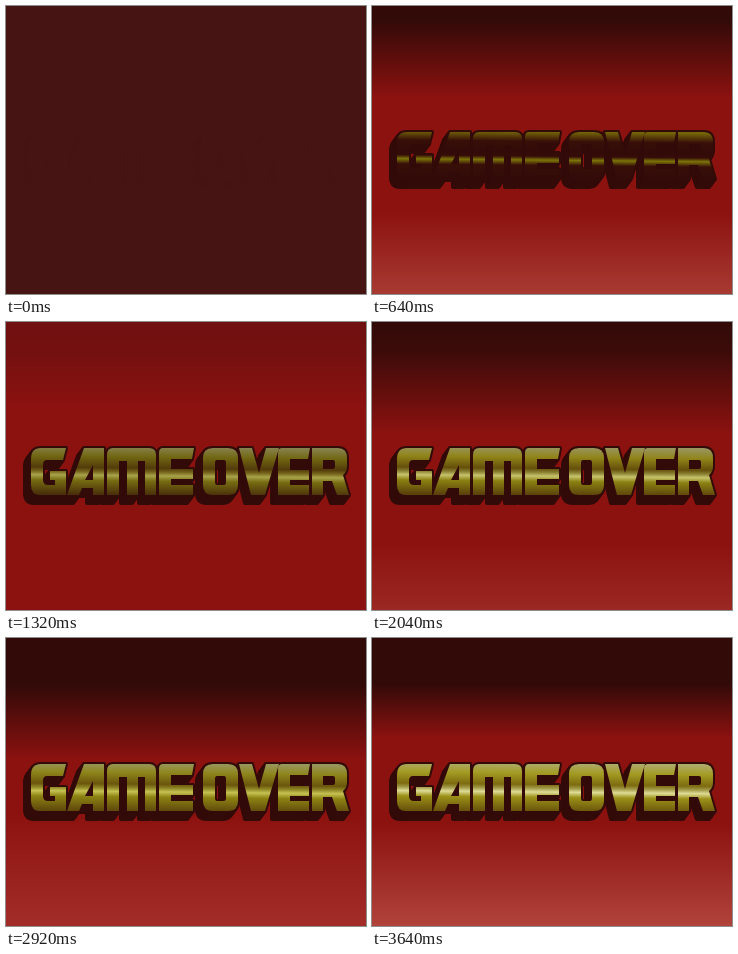
Recreate the animation shown at these times as an HTML page with a canvas. Size 360 by 288 pixels, loop 5000 ms.

```html
<!DOCTYPE html>
<html lang="en">
<head>
<meta charset="utf-8">
<title>Game over</title>
<style>
html, body { margin: 0; width: 100%; height: 100%; overflow: hidden; background: #320a08; }
canvas { display: block; width: 100vw; height: 100vh; }
</style>
</head>
<body>
<canvas id="stage" width="360" height="288" role="img" aria-label="GAME OVER"></canvas>
<script>
const ctx = document.getElementById('stage').getContext('2d');
const LOOP = 5000, STEP = 40, END = 3640;

// Letter faces: G A M E O V E R
const face = new Path2D([
  'M35 126H60L57 138H41Q37 138 37 143V158Q37 163 42 163H49V158H44V149H60V173H34Q25 173 25 163V137Q25 126 35 126Z',
  'M78 126H98V173H87V166H76L73 173H61ZM87 143V158H79Z',
  'M107 126H143Q150 126 150 133V173H139V139H132V173H121V139H113V173H101V133Q101 126 107 126Z',
  'M157 126H188L186 137H165V147H187V157H165V163H187V173H153V131Q153 126 157 126Z',
  'M207 126H222Q232 126 232 136V163Q232 173 222 173H207Q197 173 197 163V136Q197 126 207 126ZM211 138Q209 138 209 141V160Q209 163 211 163H218Q220 163 220 160V141Q220 138 218 138Z',
  'M233 126H246L253 151L260 126H273L259 173H245Z',
  'M276 126H304L302 137H284V148H303V158H284V163H303V173H272V131Q272 126 276 126Z',
  'M307 126H332Q341 126 341 136V144Q341 150 337 153L343 173H331L326 159H317V173H306V126ZM317 138V147H327Q329 147 329 145V140Q329 138 327 138Z'
].join(''));

// Time, background bends (y), background colours, shadow, face colours
const keys = [
  [0, [20, 92, 212], '451413 451413 451413 451413', '451413', '451413 451413 451413 451413 451413 451413 451413'],
  [640, [14, 92, 208], '320a08 320a08 8c1210 a83a32', '320a08', '746408 380f08 320a08 360d08 7c7408 380f08 320a08'],
  [1320, [30, 86, 250], '701010 741010 8c1210 8c1210', '320a08', '86804a 716712 533b0a 76651b a8a34a 776c12 4a300a'],
  [2040, [28, 112, 222], '320a08 3b0b09 8c1210 9b2822', '320a08', '98945a 908418 654f0b 898031 c7c36c 8b8112 5b420b'],
  [2520, [45, 134, 166], '320a08 320a08 8c1210 9c211d', '320a08', '908e52 82791a 624c0b 847b18 bab530 897f12 5d460b'],
  [3280, [48, 112, 188], '320a08 320a08 8c1210 a93831', '320a08', 'a09e62 98901c 735f0d 978e30 d0cd70 908714 654e0c'],
  [END, [46, 100, 186], '320a08 320a08 8c1210 b1433b', '320a08', 'aeaa67 a39b22 7d6b10 a29a48 dfdc96 9b9118 6b550c']
];
const goldStops = [0, .2, .44, .52, .6, .71, 1];

const mix = (a, b, k) => a + (b - a) * k;
const rgb = hex => [0, 2, 4].map(i => parseInt(hex.slice(i, i + 2), 16));

function mixColors(a, b, k) {
  const from = a.split(' '), to = b.split(' ');
  return from.map((hex, i) => {
    const end = rgb(to[i]);
    return 'rgb(' + rgb(hex).map((c, j) => Math.round(mix(c, end[j], k))) + ')';
  });
}

function poseAt(t) {
  let i = 0;
  while (i < keys.length - 2 && t >= keys[i + 1][0]) i++;
  const a = keys[i], b = keys[i + 1];
  const k = (t - a[0]) / (b[0] - a[0]);
  return {
    bends: a[1].map((y, j) => mix(y, b[1][j], k)),
    sky: mixColors(a[2], b[2], k),
    shadow: mixColors(a[3], b[3], k)[0],
    gold: mixColors(a[4], b[4], k)
  };
}

function drawBackground({ bends, sky }) {
  const g = ctx.createLinearGradient(0, 0, 0, 288);
  g.addColorStop(0, sky[0]);
  g.addColorStop(bends[0] / 288, sky[1]);
  g.addColorStop(bends[1] / 288, sky[2]);
  g.addColorStop(bends[2] / 288, sky[2]);
  g.addColorStop(1, sky[3]);
  ctx.fillStyle = g;
  ctx.fillRect(0, 0, 360, 288);
}

function drawTitle({ shadow, gold }) {
  ctx.fillStyle = ctx.strokeStyle = shadow;
  ctx.lineWidth = 4;
  ctx.lineJoin = 'round';
  for (let d = 8; d >= 0; d--) {
    ctx.save();
    ctx.translate(-d * .75, d);
    ctx.fill(face, 'evenodd');
    ctx.stroke(face);
    ctx.restore();
  }
  // The shine drops slightly towards the right
  const g = ctx.createLinearGradient(184, 126, 183.5, 173);
  goldStops.forEach((s, i) => g.addColorStop(s, gold[i]));
  ctx.fillStyle = g;
  ctx.fill(face, 'evenodd');
}

const start = performance.now();
function frame() {
  const time = (performance.now() - start) % LOOP;
  const pose = poseAt(Math.min(Math.floor(time / STEP) * STEP, END));
  drawBackground(pose);
  drawTitle(pose);
  requestAnimationFrame(frame);
}
frame();
</script>
</body>
</html>
```
